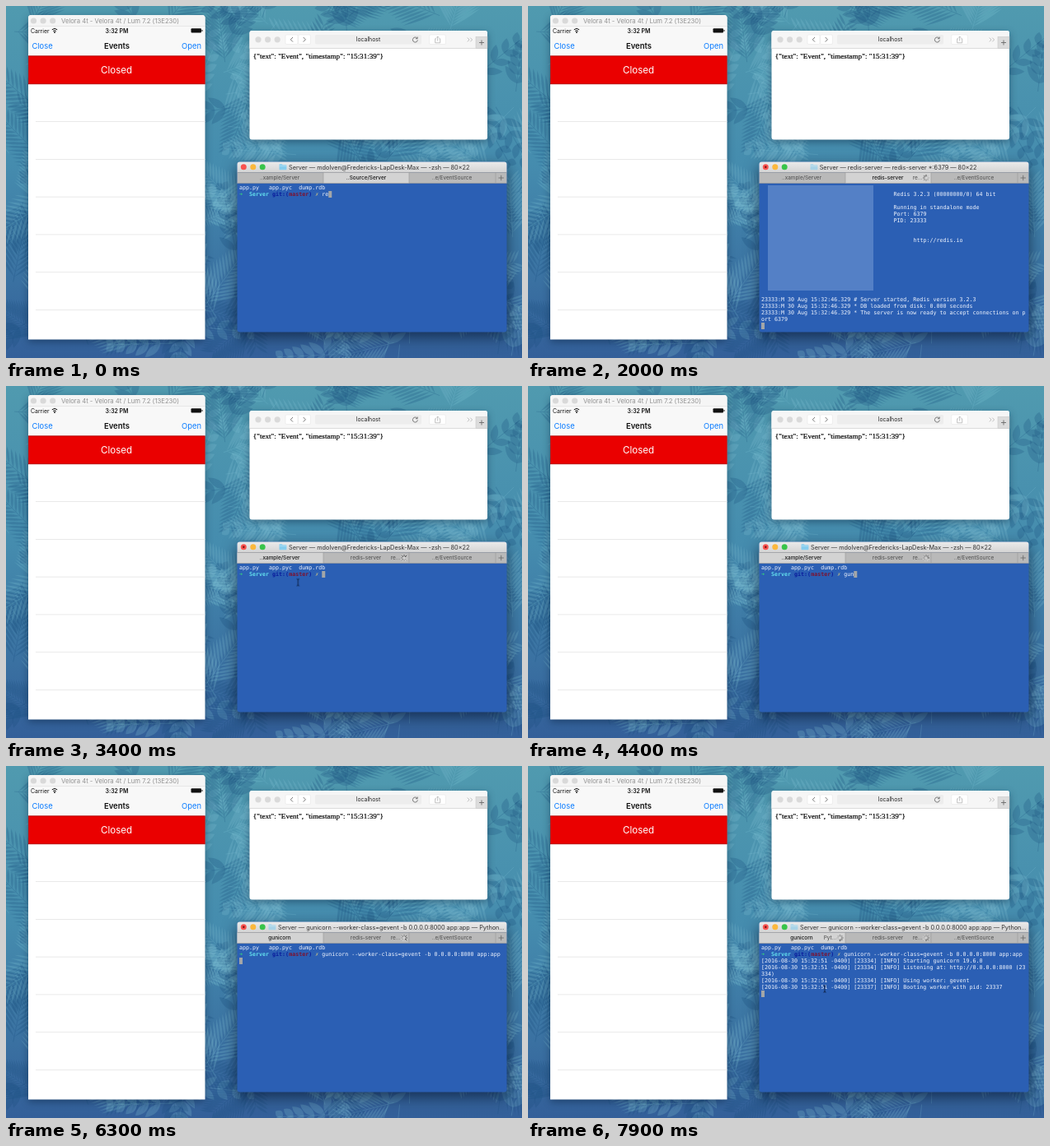
Write an HTML page with a canvas that moves like this. It is 626 by 428 pixels and loops after 8000 ms.

```html
<!DOCTYPE html>
<html lang="en">
<head>
<meta charset="utf-8">
<title>Event server demo</title>
<style>
html, body { margin: 0; width: 626px; height: 428px; overflow: hidden; background: #4385a9; }
canvas, svg { position: absolute; left: 0; top: 0; display: block; }
text { font-family: Inter, Roboto, sans-serif; }
.mono text { font: 6.66px "DejaVu Sans Mono", "Liberation Mono", monospace; white-space: pre; fill: #f2f6ff; }
.mono .b { font-weight: bold; }
.title { font-size: 7.3px; fill: #333; }
.tab { font-size: 6.45px; fill: #4c4c4c; text-anchor: middle; }
.tab.on { fill: #161616; font-weight: 500; }
.json { font: 9.13px "Liberation Serif", "Noto Serif", serif; stroke: #000; stroke-width: .2px; }
.soft { filter: drop-shadow(0 3px 5px rgba(0, 20, 45, .4)); }
.deep { filter: drop-shadow(0 6px 9px rgba(0, 12, 35, .62)); }
.spin { animation: spin .8s steps(8) infinite; }
#mouse { animation: move 8s infinite; }
@keyframes spin { to { transform: rotate(360deg); } }
@keyframes move {
  0%, 30% { transform: translate(437px, 208px); animation-timing-function: ease-in-out; }
  35%, 39% { transform: translate(348.5px, 206px); animation-timing-function: ease-in-out; }
  46%, 100% { transform: translate(360px, 271px); }
}
</style>
</head>
<body>
<canvas id="wall" width="626" height="428"></canvas>
<svg width="626" height="428" viewBox="0 0 626 428">
  <defs>
    <linearGradient id="bar" x2="0" y2="1">
      <stop stop-color="#ebebeb"/><stop offset="1" stop-color="#d3d3d3"/>
    </linearGradient>
    <g id="lights"><circle r="3.6"/><circle cx="11.6" r="3.6"/><circle cx="23.2" r="3.6"/></g>
    <g id="folder" fill="#86cdee">
      <path d="M0 1.2q0-.7.7-.7h2.5l1 1h4q.7 0 .7.7v4.6q0 .7-.7.7h-7.5q-.7 0-.7-.7z"/>
      <path d="M0 2.6h8.9" stroke="#b9e4f7" stroke-width=".7"/>
    </g>
    <g id="spinner"><circle r="4.3" fill="#dedede" opacity=".7"/><g class="spin spokes"></g></g>
  </defs>

  <!-- phone -->
  <path class="soft" d="M27 14.5q0-3.5 3.5-3.5h207.500q3.5 0 3.5 3.5V405.500H27z" fill="#fff"/>
  <path d="M27 24.5v-10q0-3.5 3.5-3.5h207.500q3.5 0 3.5 3.5v10z" fill="#f5f5f5"/>
  <use href="#lights" x="33.5" y="18" fill="#d9d9d9"/>
  <text x="138.5" y="20.6" font-size="7.7" text-anchor="middle" fill="#929292">Velora 4t - Velora 4t / Lum 7.2 (13E230)</text>
  <path d="M27 24.5h214.500V60.500H27z" fill="#f8f8f8"/>
  <path d="M27 24.5h214.500" stroke="#dcdcdc" stroke-width=".6"/>
  <g fill="#111">
    <text x="30" y="32.6" font-size="6.9">Carrier</text>
    <path d="M55.8 28.8q3.2-2.9 6.4 0M57.2 30.5q1.8-1.6 3.6 0" fill="none" stroke="#111"/>
    <circle cx="59" cy="32" r=".9"/>
    <text x="134.5" y="32.6" font-size="6.9" font-weight="600" text-anchor="middle">3:32 PM</text>
    <rect x="224.5" y="27.3" width="12.5" height="5.2" rx="1"/>
    <rect x="237.5" y="28.9" width="1" height="2"/>
    <text x="134.5" y="51.6" font-size="9.5" font-weight="600" text-anchor="middle">Events</text>
  </g>
  <g fill="#0b7cff" font-size="9.4">
    <text x="31.5" y="51.6">Close</text>
    <text x="237" y="51.6" text-anchor="end">Open</text>
  </g>
  <rect x="27.3" y="60.8" width="213.9" height="34" fill="#ea0000" stroke="#a90000" stroke-width=".8"/>
  <text x="134" y="81.8" font-size="11.5" text-anchor="middle" fill="#fff">Closed</text>
  <path d="M36 140.500h205.500m-205.500 46h205.500m-205.500 45.700h205.500m-205.500 45.700h205.500m-205.500 45.700h205.500m-205.500 46h205.500" stroke="#e4e4e4" stroke-width=".8"/>

  <!-- browser -->
  <rect class="soft" x="295.5" y="30" width="288.5" height="132.5" rx="3" fill="#fff"/>
  <path d="M295.500 51.500V33q0-3 3-3h282.500q3 0 3 3v18.500z" fill="#f6f6f6"/>
  <path d="M295.500 51.500h288.500" stroke="#cfcfcf" stroke-width=".7"/>
  <use href="#lights" x="306" y="40.8" fill="#dadada"/>
  <g fill="#fff" stroke="#e0e0e0" stroke-width=".5">
    <rect x="339" y="35" width="15" height="11.5" rx="1.5"/>
    <rect x="354.5" y="35" width="15" height="11.5" rx="1.5"/>
    <rect x="513.5" y="35" width="20" height="11.5" rx="1.5"/>
  </g>
  <rect x="375" y="35" width="129" height="11.5" rx="1.5" fill="#ededed"/>
  <rect x="570" y="37.5" width="14" height="14" fill="#dcdcdc" stroke="#c4c4c4" stroke-width=".5"/>
  <g fill="none" stroke="#6a6a6a" stroke-width=".9">
    <path d="M348 38l-2.7 2.8 2.7 2.8M360.700 38l2.7 2.8-2.7 2.8"/>
    <path d="M498.800 39.2a3 3 0 1 0 .6 2.2M499.200 37.5v2.2h-2.2"/>
    <path d="M574 44.5h6m-3-3v6"/>
  </g>
  <g fill="none" stroke="#b0b0b0" stroke-width=".8">
    <path d="M522 39.8h-1.3v5h6v-5h-1.3M523.700 42.5v-5.5m-1.5 1.5l1.5-1.5 1.5 1.5"/>
    <path d="M559.800 38.6l2.3 2.4-2.3 2.4m3.5-4.8l2.3 2.4-2.3 2.4"/>
  </g>
  <text x="439.5" y="43.4" font-size="6.9" text-anchor="middle" fill="#222">localhost</text>
  <text class="json" x="299.8" y="63.9">{"text": "Event", "timestamp": "15:31:39"}</text>

  <!-- terminal -->
  <rect class="deep" x="280.5" y="189.5" width="327" height="207" rx="3" fill="#2b5fb4"/>
  <path d="M280.500 202.500v-10q0-3 3-3h321q3 0 3 3v10z" fill="url(#bar)"/>
  <circle cx="288.3" cy="195.7" r="3.5" fill="#f9534f"/>
  <circle cx="299.8" cy="195.7" r="3.5" fill="#fbb83c"/>
  <circle cx="311.2" cy="195.7" r="3.5" fill="#38c44a"/>
  <circle data-on="800-8000" cx="288.3" cy="195.7" r="1.3" fill="#7c1512"/>
  <path d="M280.500 202.500h327v13h-327z" fill="#b9b9b9"/>
  <path data-on="2600-3000" d="M280.500 202.500H385v13H280.500z" fill="#acacac"/>
  <path data-on="0-3000" d="M385 202.500h104v13H385z" fill="#d3d3d3"/>
  <path data-on="3000-8000" d="M280.500 202.500H385v13H280.500z" fill="#d3d3d3"/>
  <path d="M280.500 202.500h327M385 202.500v13m104-13v13m105-13v13M280.500 215.500h327" stroke="#979797" stroke-width=".6"/>
  <path data-on="2600-3400" d="M285.500 207.300l3.6 3.6m0-3.6l-3.6 3.6" stroke="#555" stroke-width=".8"/>
  <path d="M597.500 209h6.400m-3.2-3.2v6.4" stroke="#666" stroke-width=".8"/>

  <g data-on="0-800 3000-6000">
    <use href="#folder" x="331.5" y="191.8"/>
    <text class="title" x="343" y="198.5">Server — mdolven@Fredericks-LapDesk-Max — -zsh — 80×22</text>
  </g>
  <g data-on="800-3000">
    <use href="#folder" x="342.5" y="191.8" opacity=".6"/>
    <text class="title" x="353.7" y="198.5">Server — redis-server — redis-server *:6379 — 80×22</text>
  </g>
  <g data-on="6000-8000">
    <use href="#folder" x="318.5" y="191.8" opacity=".6"/>
    <text class="title" x="330" y="198.5">Server — gunicorn --worker-class=gevent -b 0.0.0.0:8000 app:app — Python...</text>
  </g>

  <text class="tab" data-on="0-3000" x="332" y="211.3">..xample/Server</text>
  <text class="tab on" data-on="3000-6000" x="332" y="211.3">..xample/Server</text>
  <text class="tab on" data-on="6000-8000" x="332" y="211.3">gunicorn</text>
  <text class="tab on" data-on="0-800" x="437" y="211.3">..Source/Server</text>
  <text class="tab on" data-on="800-3000" x="436.5" y="211.3">redis-server</text>
  <text class="tab" data-on="3000-8000" x="436.5" y="211.3">redis-server</text>
  <text class="tab" x="541" y="211.3">..e/EventSource</text>
  <g data-on="1200-8000">
    <text class="tab" x="472.5" y="211.3">re...</text>
    <g transform="translate(483 209)"><use href="#spinner"/></g>
  </g>
  <g data-on="7400-8000">
    <text class="tab" x="366.5" y="211.3">Pyt...</text>
    <g transform="translate(378.500 209)"><use href="#spinner"/></g>
  </g>

  <g class="mono">
    <rect id="block" width="4" height="8" fill="#a3a6a8"/>
    <g data-on="0-800 3000-8000" id="shell"></g>
    <g data-on="800-3000" id="redis">
      <rect x="291" y="218" width="128" height="128" fill="#5480c6"/>
    </g>
    <g data-on="6400-8000" id="boot"></g>
    <g data-on="6500-8000" id="ready"></g>
  </g>

  <g id="mouse">
    <path data-on="2400-3400" d="M0 0v8l1.9-1.7 1.3 3 1.5-.7-1.3-2.8h2.5z" fill="#000" stroke="#fff" stroke-width=".6"/>
    <path data-on="3400-4200 7500-8000" d="M-1.5-4.2q1.5 0 1.5 1v6.400q0 1-1.5 1m3-8.400q-1.5 0-1.5 1m0 6.400q0 1 1.5 1" fill="none" stroke="#0c1a38" stroke-width=".9"/>
  </g>
</svg>
<script>
const LOOP = 8000, COL = 4.01, ROW = 8, LEFT = 283, TOP = 217;
const SVG = 'http://www.w3.org/2000/svg';
const $ = id => document.getElementById(id);

function add(parent, tag, attrs, content = '') {
  const el = document.createElementNS(SVG, tag);
  for (const k in attrs) el.setAttribute(k, attrs[k]);
  el.textContent = content;
  return parent.appendChild(el);
}

// Terminal text by row and column
function put(id, row, col, content, fill, cls = '') {
  const el = add($(id), 'text', { x: LEFT + col * COL, y: TOP + row * ROW + 6.4, class: cls }, content);
  if (fill) el.style.fill = fill;
  return el;
}

put('shell', 0, 0, 'app.py   app.pyc  dump.rdb');
put('shell', 1, 0, '➜', '#35d37a', 'b');
put('shell', 1, 3, 'Server', '#62dcec', 'b');
put('shell', 1, 10, 'git:(', '#0a1c9c', 'b');
put('shell', 1, 15, 'master', '#7d1230', 'b');
put('shell', 1, 21, ')', '#0a1c9c', 'b');
put('shell', 1, 23, '✗', '#b9b68a');
const typed = put('shell', 1, 25, '');

put('redis', 1, 40, 'Redis 3.2.3 (00000000/0) 64 bit');
put('redis', 3, 40, 'Running in standalone mode');
put('redis', 4, 40, 'Port: 6379');
put('redis', 5, 40, 'PID: 23333');
put('redis', 8, 46, 'http://redis.io');
['# Server started, Redis version 3.2.3',
 '* DB loaded from disk: 0.000 seconds',
 '* The server is now ready to accept connections on p'
].forEach((s, i) => put('redis', 17 + i, 0, '23333:M 30 Aug 15:32:46.329 ' + s));
put('redis', 20, 0, 'ort 6379');

const log = (id, row, pid, s) => put(id, row, 0, `[2016-08-30 15:32:51 -0400] [${pid}] [INFO] ${s}`);
log('boot', 2, 23334, 'Starting gunicorn 19.6.0');
log('boot', 3, 23334, 'Listening at: http://0.0.0.0:8000 (23');
put('boot', 4, 0, '334)');
log('ready', 5, 23334, 'Using worker: gevent');
log('ready', 6, 23337, 'Booting worker with pid: 23337');

for (let i = 0; i < 8; i++)
  add(document.querySelector('.spokes'), 'path', {
    d: 'M0-1.7V-4', stroke: '#333', 'stroke-width': 1.1,
    opacity: 0.2 + i * 0.1, transform: `rotate(${i * 45})`
  });

// Each step: time, typed command, row of the block when it is not after the command
const serve = 'gunicorn --worker-class=gevent -b 0.0.0.0:8000 app:app';
const steps = [
  [0, 're'], [100, 'red'], [200, 'redi'], [300, 'redis'], [400, 'redis-'], [500, 'redis-server'],
  [800, '', 21], [3000, ''], [4200, 'g'], [4300, 'gu'], [4400, 'gun'], [4800, serve],
  [6000, serve, 2], [6400, serve, 5], [6500, serve, 7]
];

const timed = [...document.querySelectorAll('[data-on]')].map(el => ({
  el, spans: el.dataset.on.split(' ').map(s => s.split('-').map(Number))
}));

const start = performance.now();
function draw() {
  const t = (performance.now() - start) % LOOP;
  for (const { el, spans } of timed)
    el.style.visibility = spans.some(([a, b]) => t >= a && t < b) ? 'visible' : 'hidden';
  const [, command, row] = steps.findLast(s => s[0] <= t);
  typed.textContent = command;
  $('block').setAttribute('x', LEFT + (row ? 0 : 25 + command.length) * COL);
  $('block').setAttribute('y', TOP + (row || 1) * ROW);
  requestAnimationFrame(draw);
}

// Wallpaper: seeded palm fronds and broad leaves on a blue gradient
function paintWall() {
  const c = $('wall').getContext('2d');
  let seed = 11;
  const rnd = () => (seed = seed * 16807 % 2147483647) / 2147483647;
  const g = c.createLinearGradient(0, 0, 0, 428);
  g.addColorStop(0, '#509aaf');
  g.addColorStop(0.45, '#458cae');
  g.addColorStop(1, '#335f99');
  c.fillStyle = g;
  c.fillRect(0, 0, 626, 428);

  function leaf(x, angle, len, wide) {
    c.save();
    c.translate(x, 0);
    c.rotate(angle);
    c.beginPath();
    c.moveTo(0, 0);
    c.quadraticCurveTo(len * 0.45, -wide, len, 0);
    c.quadraticCurveTo(len * 0.45, wide, 0, 0);
    c.fill();
    c.restore();
  }

  for (let n = 0; n < 190; n++) {
    const palm = rnd() < 0.6, size = 50 + rnd() * 45, pairs = palm ? 13 : 5;
    c.save();
    c.translate(rnd() * 626, rnd() * 428);
    c.rotate(rnd() * Math.PI * 2);
    c.fillStyle = c.strokeStyle = n % 2 ? 'rgba(126,193,212,.25)' : 'rgba(22,76,124,.25)';
    c.lineWidth = 0.9;
    c.beginPath();
    c.moveTo(0, 0);
    c.lineTo(size, 0);
    c.stroke();
    for (let i = 1; i <= pairs; i++) {
      const x = size * i / pairs, len = (palm ? 38 : 25) * (1.15 - 0.7 * i / pairs);
      for (const side of [-1, 1]) leaf(x, side * (palm ? 0.75 : 0.7), len, palm ? 3 : 9);
    }
    c.restore();
  }
}

paintWall();
draw();
</script>
</body>
</html>
```
